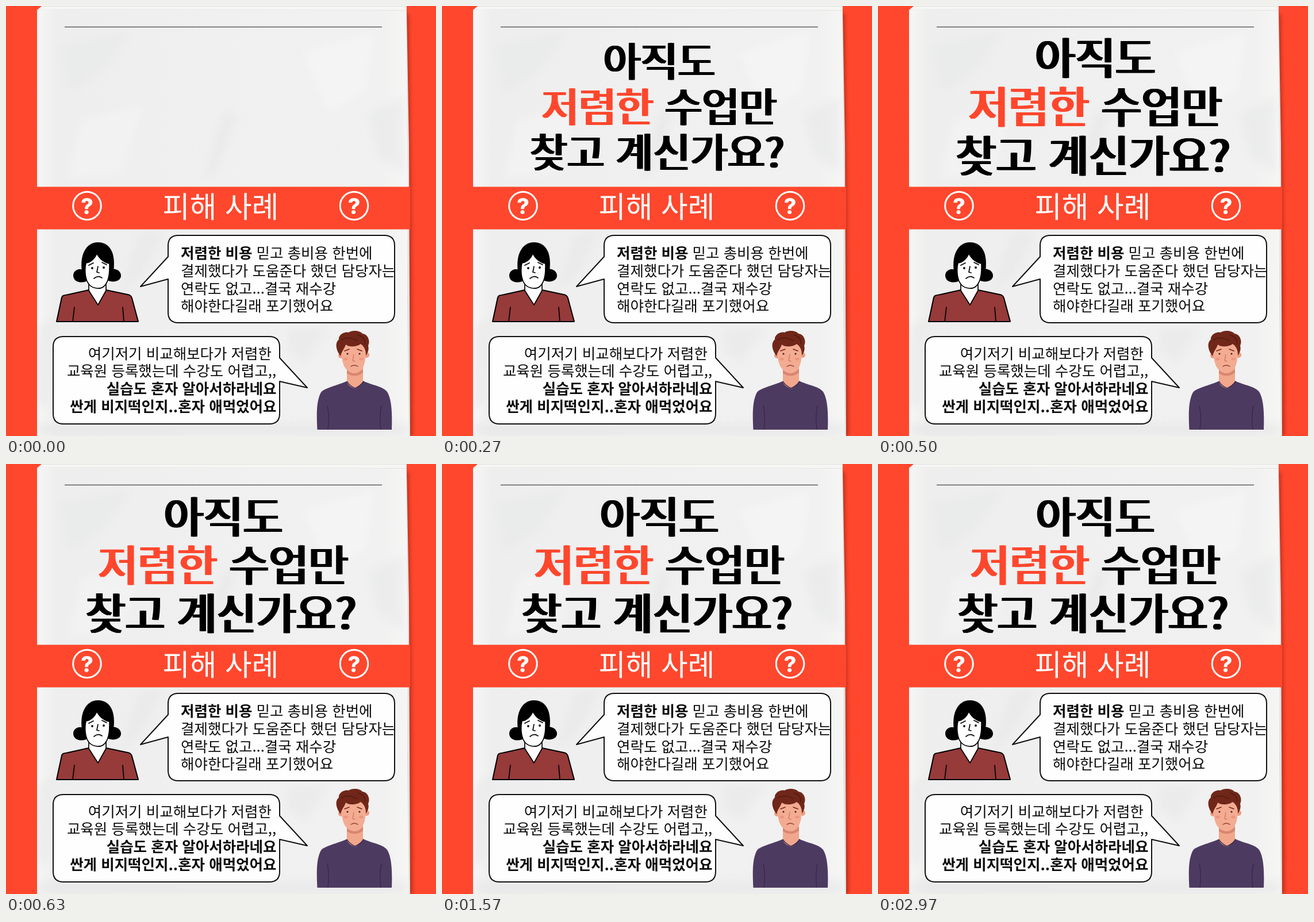
Write an HTML page that moves like this. It is 748x748 px and loops after 3.01 s.

```html
<!DOCTYPE html>
<html lang="ko">
<head>
<meta charset="utf-8">
<title>피해 사례</title>
<style>
  html, body { margin: 0; width: 100%; height: 100%; overflow: hidden; background: #fe472d; }
  svg { display: block; width: 100vw; height: 100vh; }
  text { font-family: "Noto Sans CJK KR", "Noto Sans CJK", "Noto Sans KR", sans-serif; }
  .title { font-size: 75px; text-anchor: middle; }
  .red { fill: #fe472d; }
  .quote { font-size: 25.5px; fill: #0c0c0c; }
  .quote .b, .quote.b { font-weight: 700; }
  .end { text-anchor: end; }
  .mark { font: 800 38px Inter, "Open Sans", sans-serif; text-anchor: middle; fill: #fff; }
  .bubble { fill: #fefefe; stroke: #111; stroke-width: 2; stroke-linejoin: round; }
  .ink { fill: none; stroke: #000; stroke-width: 1.7; stroke-linecap: round; stroke-linejoin: round; }

  /* The headline drops in oversized, undershoots, then settles. */
  #headline { transform-origin: 377px 176px; animation: stomp 3010ms linear infinite; }
  @keyframes stomp {
    0%, .8% { opacity: 0; transform: scale(1.34); }
    2.6%    { opacity: 1; transform: scale(1.3); }
    4.32%   { opacity: 1; transform: scale(1.19); }
    6.31%   { transform: scale(1.02); }
    7.64%   { transform: scale(.95); }
    8.97%   { transform: scale(.94); }
    10.96%  { transform: scale(.968); }
    13.29%  { transform: scale(1.004); }
    14.95%  { transform: scale(1.016); }
    16.61%  { transform: scale(1.014); }
    18.6%   { transform: scale(1.004); }
    20.6%, 100% { opacity: 1; transform: scale(1); }
  }
</style>
</head>
<body>
<svg viewBox="0 0 748 748">
  <defs>
    <linearGradient id="sheet">
      <stop offset="0" stop-color="#f6f6f5"/>
      <stop offset=".05" stop-color="#eeeeee"/>
      <stop offset=".5" stop-color="#f0f0f0"/>
      <stop offset=".93" stop-color="#f1f1f1"/>
      <stop offset="1" stop-color="#f6f6f5"/>
    </linearGradient>
    <filter id="soft" x="-50%" y="-50%" width="200%" height="200%"><feGaussianBlur stdDeviation="7"/></filter>
    <filter id="shade" x="-200%" width="500%"><feGaussianBlur stdDeviation="3"/></filter>
    <clipPath id="page"><path d="M54 7 64 3 697 3 703 748H54Z"/></clipPath>
  </defs>

  <rect width="748" height="748" fill="#fe472d"/>

  <!-- paper -->
  <path d="M690 14 700 14 704 300 707 748H690Z" fill="#8d1a0c" opacity=".6" filter="url(#shade)"/>
  <path d="M54 7 62 0H697L697 8 701 240 703 748H54Z" fill="#e1e1e0"/>
  <path d="M54 8 66 5 696 8 699 300 698 520 701 748H54Z" fill="url(#sheet)"/>
  <path d="M54 7 62 1H696V7L66 5Z" fill="#f6f6f5"/>
  <g clip-path="url(#page)" filter="url(#soft)" opacity=".5">
    <path d="M95 70 215 45 170 110 110 150Z" fill="#e6e7e7"/>
    <path d="M380 185 400 190 365 290 345 300Z" fill="#e4e4e4"/>
    <path d="M515 80 640 45 625 150 560 185Z" fill="#f8f8f8"/>
    <path d="M630 190 690 160 690 290 650 260Z" fill="#e5e6e6"/>
    <path d="M130 200 240 170 200 290 110 300Z" fill="#f6f6f6"/>
    <path d="M230 400 275 390 240 460 200 500Z" fill="#e5e5e5"/>
    <path d="M55 560 85 540 75 690 55 700Z" fill="#e6e6e6"/>
    <path d="M490 560 560 560 520 620 490 600Z" fill="#e6e6e6"/>
    <path d="M55 725H700V748H55Z" fill="#e4e4e4"/>
  </g>
  <path d="M102 36.5H654" stroke="#5d5d5d" stroke-width="1.6"/>

  <!-- headline: side copies thicken the upright strokes only -->
  <g id="headline">
    <g id="words" class="title">
      <text x="378" y="119.5">아직도</text>
      <text x="378" y="203.5"><tspan class="red">저렴한</tspan> 수업만</text>
      <text x="374" y="287.5">찾고 계신가요?</text>
    </g>
    <use href="#words" x="-2.6"/>
    <use href="#words" x="2.6"/>
  </g>

  <!-- band -->
  <rect x="53" y="314.5" width="650" height="74" fill="#fe472d"/>
  <text x="373.5" y="367.5" font-size="51" text-anchor="middle" fill="#fff">피해 사례</text>
  <g fill="none" stroke="#fff" stroke-width="3">
    <circle cx="141" cy="347.5" r="24.3"/>
    <circle cx="605.5" cy="347.5" r="24.3"/>
  </g>
  <text class="mark" x="141" y="361.5">?</text>
  <text class="mark" x="605.5" y="361.5">?</text>

  <!-- first quote -->
  <path class="bubble" d="M282 436V417Q282 399 300 399H658Q676 399 676 417V533Q676 551 658 551H300Q282 551 282 533V475L234 488Z"/>
  <g class="quote">
    <text x="304" y="438.5"><tspan class="b">저렴한 비용</tspan> 믿고 총비용 한번에</text>
    <text x="304" y="469.5">결제했다가 도움준다 했던 담당자는</text>
    <text x="304" y="500.5">연락도 없고...결국 재수강</text>
    <text x="304" y="531">해야한다길래 포기했어요</text>
  </g>

  <!-- second quote -->
  <path class="bubble" d="M476 612V593Q476 575 458 575H100Q82 575 82 593V709Q82 727 100 727H458Q476 727 476 709V653L524 664Z"/>
  <g class="quote end">
    <text x="462" y="613.5">여기저기 비교해보다가 저렴한</text>
    <text x="470" y="644">교육원 등록했는데 수강도 어렵고,,</text>
    <text class="b" x="470.5" y="674.5">실습도 혼자 알아서하라네요</text>
    <text class="b" x="470.5" y="705.5">싼게 비지떡인지..혼자 애먹었어요</text>
  </g>

  <!-- woman -->
  <g>
    <path d="M135 460C129 455 117 459 117 469C117 479 129 484 142 478ZM181 458C190 455 201 461 200 470C199 479 186 482 176 477Z"/>
    <path d="M132 462C128 433 139 411 160 411C182 411 191 432 187 461L180 470H138Z"/>
    <path d="M88 549 97 507C98 503 102 503 108 502L144 494H174L212 502C217 503 218 505 219 508L230 549Z" fill="#963a3a" stroke="#000" stroke-width="2" stroke-linejoin="round"/>
    <path class="ink" d="M144 480V495L160 520 174 495V478" style="fill:#fff"/>
    <path class="ink" d="M139 447C136 462 138 477 145 485C152 492 164 493 170 488C177 482 181 470 180 448C170 446 161 438 158 430C155 439 147 446 139 447Z" style="fill:#fff"/>
    <path class="ink" d="M180 457C185 454 187 460 183 465L180 467M119 524 116 549M203 524 205 549M144 451 152 447M167 446 175 450M160 453 158 463 162 464M153 474Q160 468 167 473"/>
    <circle cx="150" cy="456" r="1.9"/><circle cx="170" cy="455" r="1.9"/>
  </g>

  <!-- man -->
  <g>
    <path d="M541.5 737C540 709 540 686 548 672C554 664 575 661 594 652H621C637 660 655 661 663 671C671 684 672 708 671 737Z" fill="#4d3a61"/>
    <path d="M593 626H621V653C618 660 612 664 607 666C600 663 594 659 593 653Z" fill="#f1a78c"/>
    <path d="M593 631Q606 647 621 631V638Q607 648 593 639Z" fill="#d98670"/>
    <path d="M593 653Q597 660 607 665Q617 661 622 653" fill="none" stroke="#37284a" stroke-width="1.5"/>
    <circle cx="583" cy="608" r="5" fill="#eb9c82"/><circle cx="627" cy="607" r="5" fill="#eb9c82"/>
    <path d="M584 590C582 613 586 627 594 634C601 640 611 640 617 634C625 626 627 610 625 589Q604 574 584 590Z" fill="#f3ac92"/>
    <path d="M582 609C575 600 571 587 579 580C578 572 589 566 596 568C603 563 616 565 620 570C630 571 634 583 630 591C632 598 629 604 626 608C626 598 623 592 617 588C608 594 596 593 591 589C589 596 584 600 582 609Z" fill="#702719"/>
    <path d="M583 581Q597 573 612 583M612 572Q626 576 624 588" fill="none" stroke="#511a12" stroke-width="1.5"/>
    <g fill="none" stroke="#702719" stroke-width="1.5" stroke-linecap="round">
      <path d="M589 600 597 597M611 597 619 600"/>
      <path d="M600 627Q606 623 612 627" stroke="#934538"/>
      <path d="M605 606 603 617 607 618" stroke="#d67e68"/>
    </g>
    <g fill="#43211d"><circle cx="594" cy="605" r="1.6"/><circle cx="615" cy="605" r="1.6"/></g>
    <g fill="#ea8573" opacity=".55"><ellipse cx="591" cy="614" rx="4" ry="2.5"/><ellipse cx="618" cy="614" rx="4" ry="2.5"/></g>
    <path d="M559 695Q563 714 560 737M653 695Q649 714 652 737" fill="none" stroke="#392a4b" stroke-width="1.4"/>
  </g>
</svg>
</body>
</html>
```
